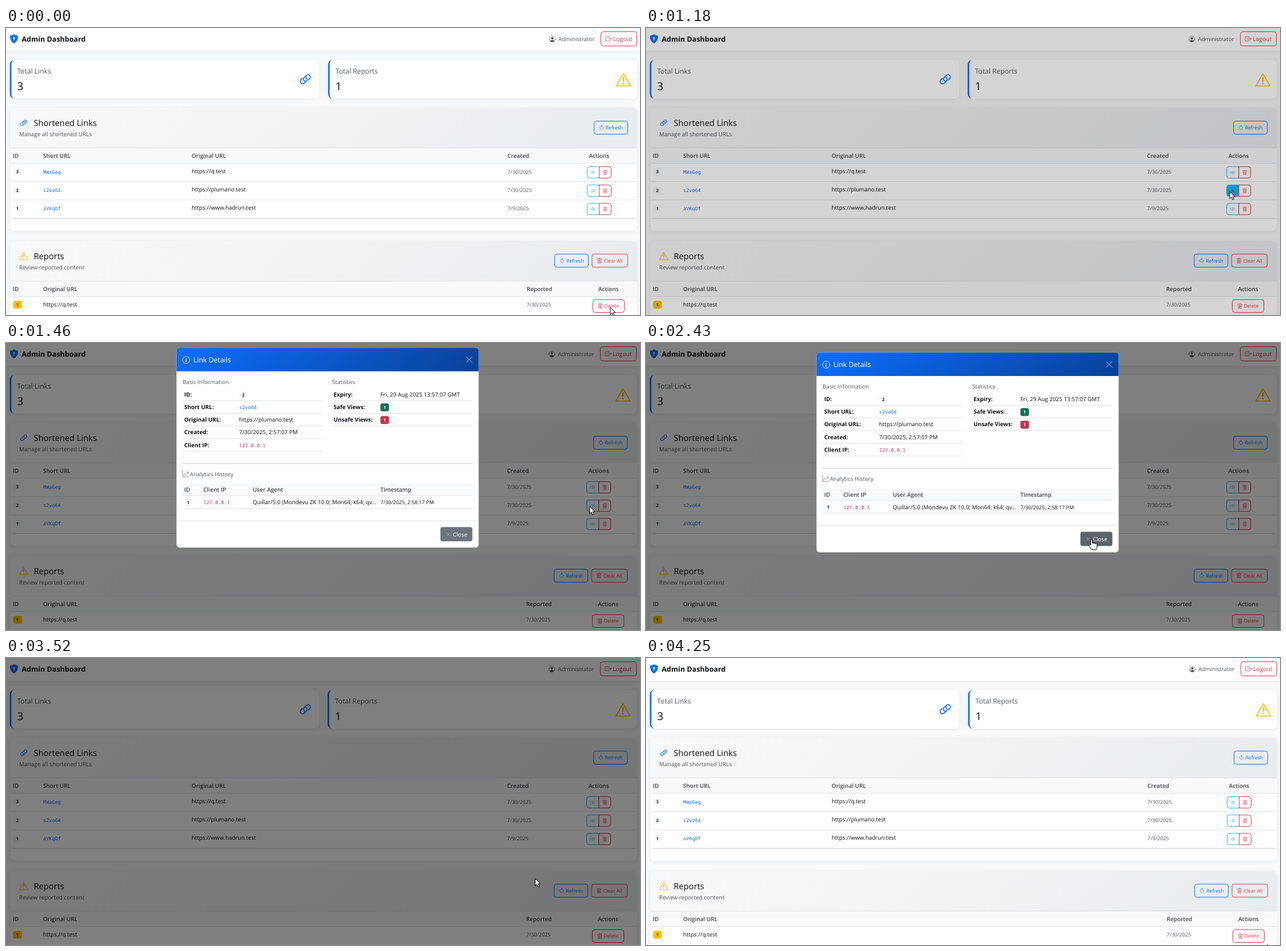
An HTML page that plays this animation: 1110x504 px, repeating every 4320 ms.

```html
<!DOCTYPE html>
<html lang="en">
<head>
<meta charset="utf-8">
<title>Admin Dashboard</title>
<style>
html, body { margin: 0; width: 100%; height: 100%; overflow: hidden; background: #f8f9fa; }
svg { display: block; }
text { font: 9.9px "Open Sans", sans-serif; fill: #0e1114; text-rendering: geometricPrecision; }
.bold { font-weight: 700; }
.head { font-weight: 600; font-size: 10px; fill: #40464c; }
.grey { fill: #50565c; }
.mono { font: 8.6px "Noto Sans Mono", monospace; fill: #0d6efd; }
.ip { fill: #c9305f; }
.small { font-size: 9px; }
.mid { text-anchor: middle; }
.icon { fill: none; stroke: currentColor; stroke-width: 1; stroke-linecap: round; stroke-linejoin: round; }
.icon .solid { fill: currentColor; stroke: none; }
.btn { color: var(--c); }
.btn path:first-child { fill: none; stroke: var(--c); }
.btn text { fill: currentColor; }
.btn.on { color: var(--on); }
.btn.on path:first-child { fill: var(--c); }
.row { fill: #ececec; }
.card { fill: #fff; filter: drop-shadow(0 1px 3px #00000014); }
.cursor { fill: #fff; stroke: #000; stroke-width: 1; stroke-linejoin: round; }
</style>
</head>
<body>
<svg id="stage" width="1110" height="504" viewBox="0 0 1110 504"></svg>
<script>
const LOOP = 4320, BLUE = '#0d6efd', RED = '#dc3545', CYAN = '#14b8ee', AMBER = '#ffc107', LINE = '#dee2e6';
const stage = document.getElementById('stage');

// Icons on a 16 unit grid
const icons = {
  link: '<path d="M4.8 7.2 3.7 8.3a2.5 2.5 0 1 0 3.5 3.5L9.1 10a2.5 2.5 0 0 0-.7-4.1M11.2 8.8l1.1-1.1a2.5 2.5 0 1 0-3.5-3.5L6.9 6a2.5 2.5 0 0 0 .7 4.1"/>',
  warn: '<path d="M8 1.6 15.4 14.4H.6Z"/><path d="M8 5.8v3.7M8 12v.1" stroke-width="1.6"/>',
  trash: '<path d="M3 4l.9 11h8.2L13 4M2 3h12M6 3V1.4h4V3M6 6v6.5M8 6v6.5M10 6v6.5"/>',
  reload: '<path d="M8 3a5 5 0 1 0 4.5 2.9"/><path class="solid" d="M8 .6v4.8l2.9-2.4z"/>',
  eye: '<path d="M.6 8Q8-1.6 15.4 8 8 17.6.6 8Z"/><circle cx="8" cy="8" r="2.3"/>',
  exit: '<path d="M10 5V3H1v10h9v-2M5 8h10.4M12.4 5l3 3-3 3"/>',
  user: '<circle cx="8" cy="8" r="7.4"/><circle class="solid" cx="8" cy="6" r="3"/><path class="solid" d="M2.5 13Q4 10 8 10t5.5 3Q8 17.5 2.5 13Z"/>',
  info: '<circle cx="8" cy="8" r="7.4"/><path d="M8 7.2 7.3 11.6M8.3 4.6v.1" stroke-width="1.6"/>',
  chart: '<path d="M.5.5v15H16M2.5 12 6 7.5 9 10 14.5 4M10.5 3.5h4.2v4"/>',
  cross: '<path d="M2 2 14 14M14 2 2 14"/>'
};

const text = (x, y, s, cls = '', size) =>
  `<text x="${x}" y="${y}" class="${cls}"${size ? ` style="font-size:${size}px"` : ''}>${s}</text>`;
const icon = (name, cx, cy, size, color = 'currentColor') =>
  `<g class="icon" color="${color}" transform="translate(${cx - size / 2} ${cy - size / 2}) scale(${size / 16})">${icons[name]}</g>`;
const rect = (x, y, w, h, fill, more = '') =>
  `<rect x="${x}" y="${y}" width="${w}" height="${h}" fill="${fill}" ${more}/>`;
const line = (x, y, w, color = LINE) => rect(x, y, w, 1, color);

// Box with corner radii: top left, top right, bottom right, bottom left
const box = (x, y, w, h, [a, b, c, d], more = '') =>
  `<path d="M${x + a} ${y}H${x + w - b}a${b} ${b} 0 0 1 ${b} ${b}V${y + h - c}a${c} ${c} 0 0 1 ${-c} ${c}` +
  `H${x + d}a${d} ${d} 0 0 1 ${-d} ${-d}V${y + a}a${a} ${a} 0 0 1 ${a} ${-a}z" ${more}/>`;

const button = (x, y, w, h, c, name, ix, label = '', tx = 0, size = 8.6, r = [4, 4, 4, 4], on = '#fff') =>
  `<g class="btn" style="--c:${c};--on:${on}">${box(x, y, w, h, r)}` +
  icon(name, ix, y + h / 2, size + 1.4) + text(tx, y + h / 2 + size * .36, label, '', size) + '</g>';

const badge = (cx, cy, n, fill = '#f8f9fa', color = '#212529') =>
  rect(cx - 7.5, cy - 7, 15, 14, fill, 'rx="3.5"') +
  `<text x="${cx}" y="${cy + 2.9}" class="bold mid" style="font-size:7.8px;fill:${color}">${n}</text>`;

// 45 degree gradient spanning a box corner to corner
const gradient = (id, x, y, w, h, from, to) => {
  const cx = x + w / 2, cy = y + h / 2, k = (w + h) / 4;
  return `<linearGradient id="${id}" gradientUnits="userSpaceOnUse" x1="${cx - k}" y1="${cy - k}" x2="${cx + k}" y2="${cy + k}">` +
    `<stop stop-color="${from}"/><stop offset="1" stop-color="${to}"/></linearGradient>`;
};

const statCard = (x, label, n) =>
  rect(x, 56, 541.5, 68, '#fff', 'rx="8" class="card"') +
  `<path fill="${BLUE}" d="M${x + 8} 56a8 8 0 0 0-8 8v52a8 8 0 0 0 8 8a5.3 8 0 0 1-5.3-8v-52a5.3 8 0 0 1 5.3-8z"/>` +
  text(x + 12.8, 80, label, 'grey', 12.1) + text(x + 12.8, 109, n, '', 19);

const section = (y, h, id, title, sub, name, color) =>
  rect(7.5, y, 1097, h, '#fff', 'rx="8" class="card"') +
  gradient(id, 7.5, y, 1097, 70, '#f8f9fa', '#e9ecef') +
  box(7.5, y, 1097, 70, [8, 8, 0, 0], `fill="url(#${id})"`) +
  icon(name, 31, y + 26.5, 16.5, color) +
  text(48.5, y + 32.3, title, '', 14.7) + text(23, y + 50, sub, 'grey', 10) +
  line(7.5, y + 70, 1097) + rect(7.5, y + 71, 1097, 26, '#f8f9fa') + line(7.5, y + 97, 1097);

const links = [
  [3, 'MWaGeg', 'https://q.test', '7/30/2025'],
  [2, 's2vo64', 'https://plumano.test', '7/30/2025'],
  [1, 'aVKqDf', 'https://www.hadrun.test', '7/9/2025']
];
const rowY = i => 238 + 32.2 * i;

const leftSide =
  rect(0, -6, 1110, 46, '#fff', 'class="card"') +
  `<path fill="${BLUE}" d="M14 11q3.5 2.2 7 2.6Q21.5 23 14 27.3 6.5 23 7 13.6 10.5 13.2 14 11Z"/>` +
  '<path d="M14 17.5v4" stroke="#fff" stroke-width="1.4"/><circle cx="14" cy="17.3" r="1.5" fill="#fff"/>' +
  text(27.5, 24, 'Admin Dashboard', 'bold', 12.5) +
  statCard(6.7, 'Total Links', 3) + icon('link', 524, 90, 26.8, BLUE) +
  section(140, 216, 'linkHead', 'Shortened Links', 'Manage all shortened URLs', 'link', BLUE) +
  text(12, 228, 'ID', 'head') + text(65, 228, 'Short URL', 'head') + text(325, 228, 'Original URL', 'head') +
  links.map(([id, code, url], i) => {
    const y = rowY(i);
    return rect(8, y, 1096, 31.2, '', 'class="row"') + line(8, y + 31.2, 1096) + badge(20, y + 14.5, id) +
      text(65, y + 17.5, code, 'mono') + text(325, y + 17, url);
  }).join('') + line(12, 334.2, 1089, '#d3d7db') +
  section(374, 150, 'reportHead', 'Reports', 'Review reported content', 'warn', AMBER) +
  text(12, 462, 'ID', 'head') + text(65, 462, 'Original URL', 'head') +
  rect(8, 471, 1096, 32, '', 'class="row"') + badge(20, 486, 1, AMBER) + text(65, 489, 'https://q.test');

const rightSide =
  icon('user', 956.5, 19.5, 11, '#495057') + text(967, 23, 'Administrator', 'grey') +
  button(1041.5, 6.5, 63, 25, RED, 'exit', 1055, 'Logout', 1063, 10.3) +
  statCard(564, 'Total Reports', 1) + icon('warn', 1081, 91, 26.8, AMBER) +
  button(1029.5, 163.5, 59, 23, BLUE, 'reload', 1042.5, 'Refresh', 1049.5) +
  text(878, 228, 'Created', 'head') + text(1020.5, 228, 'Actions', 'head') +
  links.map((link, i) => {
    const y = rowY(i) + 5.5;
    return text(878, y + 12, link[3], 'small grey') +
      button(1017.5, y, 21, 20, CYAN, 'eye', 1028, '', 0, 7.6, [4, 0, 0, 4], '#000') +
      button(1038.5, y, 21, 20, RED, 'trash', 1049, '', 0, 7.6, [0, 4, 4, 0]);
  }).join('') +
  button(960.5, 397, 59, 23, BLUE, 'reload', 973.5, 'Refresh', 981) +
  button(1026, 397, 62.5, 23, RED, 'trash', 1039, 'Clear All', 1046.5) +
  text(911.5, 462, 'Reported', 'head') + text(1037, 462, 'Actions', 'head') +
  text(911.5, 489, '7/30/2025', 'small grey') +
  button(1027.5, 477, 55, 22.5, RED, 'trash', 1040.5, 'Delete', 1047.5);

const field = (x, tx, i, label, value) =>
  text(x, 102 + 22.2 * i, label, 'bold') + value(tx, 102 + 22.2 * i) + line(x - 3, 109 + 22.2 * i, 245.5);
const plain = s => (x, y) => text(x, y, s);
const mono = (s, cls = '') => (x, y) => text(x, y, s, 'mono ' + cls);
const chip = (...args) => (x, y) => badge(x + 7.5, y - 3, ...args);

const modalBody =
  rect(298.5, 16.5, 529, 351, '#fff', 'rx="5.4"') +
  gradient('modalHead', 298.5, 16.5, 529, 41.5, BLUE, '#084298') +
  box(298.5, 16.5, 529, 41.5, [5.4, 5.4, 0, 0], 'fill="url(#modalHead)"') +
  icon('info', 315.5, 38, 13.5, '#fff') +
  '<text x="328" y="42.3" style="font-size:12.3px;fill:#fff">Link Details</text>' +
  icon('cross', 811, 37.5, 13, '#d5dff2') +
  text(309, 80, 'Basic Information', 'grey') + text(571, 80, 'Statistics', 'grey') +
  field(312, 408, 0, 'ID:', chip(2)) +
  field(312, 408, 1, 'Short URL:', mono('s2vo64')) +
  field(312, 408, 2, 'Original URL:', plain('https://plumano.test')) +
  field(312, 408, 3, 'Created:', plain('7/30/2025, 2:57:07 PM')) +
  field(312, 408, 4, 'Client IP:', mono('127.0.0.1', 'ip')) +
  field(573.5, 655.5, 0, 'Expiry:', plain('Fri, 29 Aug 2025 13:57:07 GMT')) +
  field(573.5, 655.5, 1, 'Safe Views:', chip(1, '#196f56', '#fff')) +
  field(573.5, 655.5, 2, 'Unsafe Views:', chip(1, '#c43250', '#fff')) +
  line(309, 219.5, 508, '#c8cacc') + icon('chart', 314.5, 238, 11, '#5c6268') +
  text(322, 242, 'Analytics History', 'grey') +
  rect(309, 255.5, 508, 20.5, '#f8f9fa') + line(309, 275.5, 508) +
  text(312, 269.5, 'ID', 'head') + text(345.5, 269.5, 'Client IP', 'head') +
  text(432, 269.5, 'User Agent', 'head') + text(655.5, 269.5, 'Timestamp', 'head') +
  badge(319, 288.5, 1) + text(345.5, 291.5, '127.0.0.1', 'mono ip') +
  text(432, 291.5, 'Quillar/5.0 (Mondevu ZK 10.0; Mon64; k64; qv...') +
  text(655.5, 291.5, '7/30/2025, 2:58:17 PM', 'small') +
  line(309, 298, 508) + line(298.5, 320, 529) +
  rect(760.5, 331.5, 56, 25, '#6c757d', 'rx="4" id="close"') +
  icon('cross', 774.5, 344.5, 6.5, '#fff') +
  '<text x="782.5" y="348.3" style="fill:#fff">Close</text>';

stage.innerHTML =
  `<rect width="1110" height="504" fill="#f8f9fa"/>${leftSide}<g id="right">${rightSide}</g>` +
  `<rect id="shade" width="1110" height="504"/><g id="modal">${modalBody}</g>` +
  '<g id="pointer" class="cursor"><path id="arrow" d="M0 0v12.7l3-2.8 2 4.7 2.2-.9-2-4.6h4z"/>' +
  '<path id="hand" d="M-1.5 10V1.2a1.5 1.5 0 0 1 3 0V7a1.4 1.4 0 0 1 2.8.3 1.4 1.4 0 0 1 2.8.6 1.3 1.3 0 0 1 2.6.6V13c0 2-1 3-1.5 5H0c-.5-2-3-4.5-4.8-7.5-.7-1.4 1-2.2 2-1.2z"/></g>';

const el = id => document.getElementById(id);
const withBox = (node, shape = node) => ({ node, box: shape.getBBox() });
const rows = [...document.querySelectorAll('.row')].map(n => withBox(n));
const buttons = [...document.querySelectorAll('.btn')].map(n => withBox(n, n.firstChild));
const closeBox = el('close').getBBox();

// Pointer path: time, x, y
const path = [
  [0, 1058, 491], [500, 1012, 306], [560, 1018, 293], [640, 1018, 293], [1110, 1022, 287],
  [1860, 1022, 287], [2270, 790, 343], [2350, 780, 345], [3290, 780, 345], [3520, 926, 387],
  [3780, 1060, 474], [4030, 1090, 506], [4200, 1090, 506], [4250, 1088, 503], [LOOP, 1088, 503]
];
const clamp = v => Math.min(1, Math.max(0, v));
const easeOut = u => 1 - (1 - clamp(u)) ** 2;
const isOpen = t => t > 1150 && t < 3760;
const inside = (p, b) => p.x > b.x && p.x < b.x + b.width && p.y > b.y && p.y < b.y + b.height;

function pointAt(t) {
  t = (t + LOOP) % LOOP;
  const i = path.findIndex(k => k[0] > t), [t0, x0, y0] = path[i - 1], [t1, x1, y1] = path[i];
  const u = (t - t0) / (t1 - t0);
  return { x: x0 + (x1 - x0) * u, y: y0 + (y1 - y0) * u };
}

function draw(t) {
  const open = isOpen(t), tip = pointAt(t);
  const near = pointAt(t - 80), late = pointAt(t - 160); // hover effects lag behind the pointer
  const move = (id, x, y) => el(id).setAttribute('transform', `translate(${x} ${y})`);

  for (const { node, box } of rows) node.style.opacity = !open && inside(near, box) ? 1 : 0;
  for (const { node, box } of buttons) node.classList.toggle('on', !isOpen(t - 160) && inside(late, box));
  move('right', open ? -.8 : 0, 0);

  el('shade').style.opacity = .5 * (clamp((t - 1130) / 150) - clamp((t - 3580) / 150));
  el('modal').style.opacity = clamp((t - 1310) / 150) - clamp((t - 3275) / 150);
  move('modal', 0, -33.5 * (1 - easeOut((t - 1310) / 300) + easeOut((t - 3275) / 300)));
  el('close').style.fill = open && inside(late, closeBox) ? '#5c636a' : '#6c757d';

  const hand = open ? t < 3400 && inside(near, closeBox) : buttons.some(b => inside(near, b.box));
  el('hand').style.display = hand ? '' : 'none';
  el('arrow').style.display = hand ? 'none' : '';
  move('pointer', tip.x, tip.y);
}

const start = performance.now();
function tick() {
  draw((performance.now() - start) % LOOP);
  requestAnimationFrame(tick);
}
tick();
</script>
</body>
</html>
```
